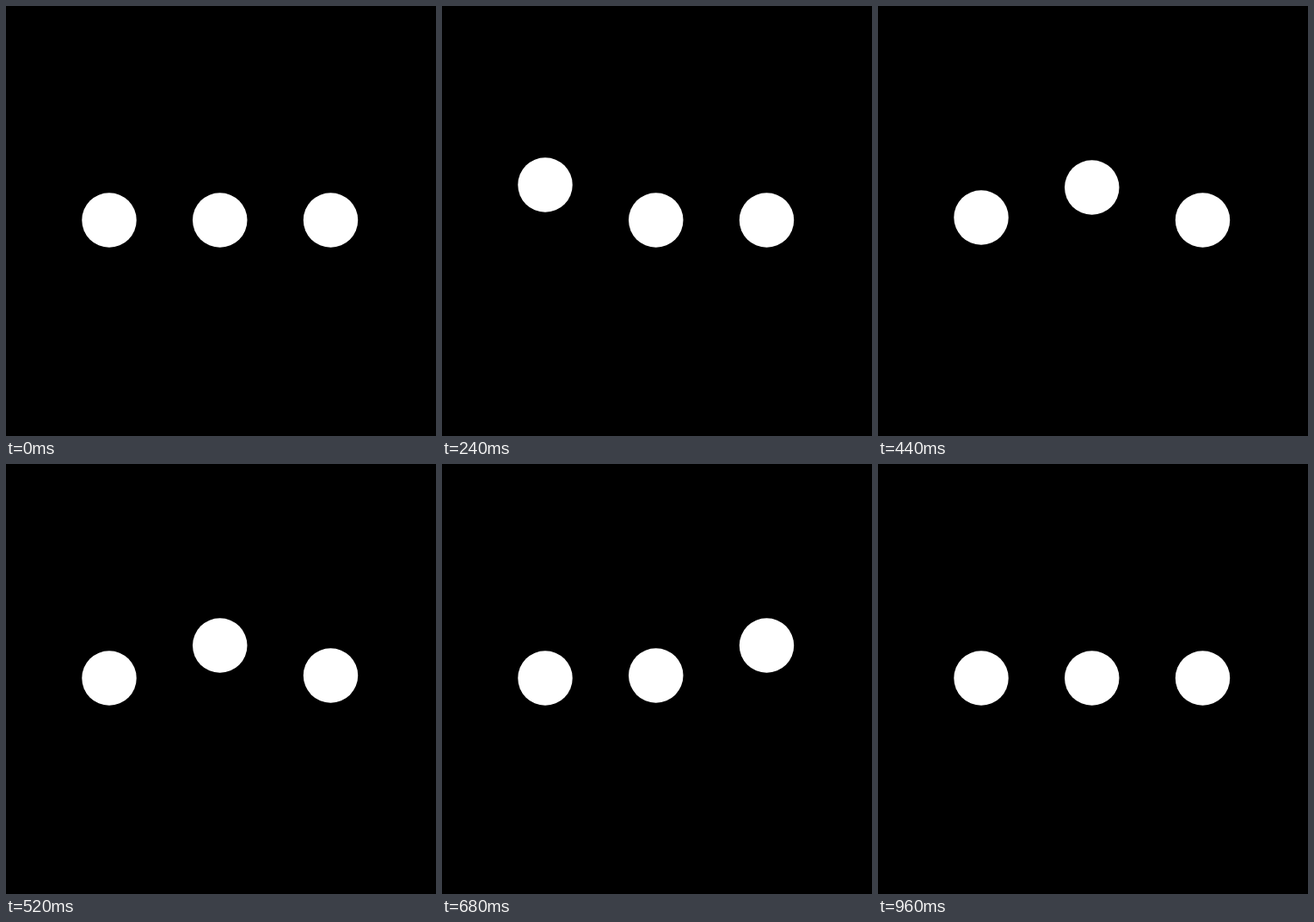
An HTML page that plays this animation: 500 px wide and 500 px high, repeating every 1160 ms.

```html
<!DOCTYPE html>
<html lang="en">
<head>
<meta charset="utf-8">
<title>Typing dots</title>
<style>
  @property --tick {
    syntax: "<number>";
    inherits: true;
    initial-value: 0;
  }

  html, body {
    margin: 0;
    width: 100%;
    height: 100%;
    overflow: hidden;
    background: #000;
  }

  /* 29 ticks of 40 ms each */
  svg {
    display: block;
    width: 100%;
    height: 100%;
    animation: clock 1160ms steps(29, end) infinite;
  }

  @keyframes clock {
    from { --tick: 0; }
    to { --tick: 29; }
  }

  /* Each dot rises for 6 ticks and falls for 6, eased by smoothstep */
  circle {
    --gap: calc(var(--tick) - var(--peak));
    --u: max(0, 1 - max(var(--gap), -1 * var(--gap)) / 6);
    --lift: calc(var(--u) * var(--u) * (3 - 2 * var(--u)));
    fill: #fff;
    transform: translateY(calc(var(--lift) * -41px));
  }

  .a { --peak: 6; }
  .b { --peak: 12; }
  .c { --peak: 18; }
</style>
</head>
<body>
<svg viewBox="0 0 500 500">
  <circle class="a" cx="120" cy="249" r="31.75"/>
  <circle class="b" cx="248.75" cy="249" r="31.75"/>
  <circle class="c" cx="377.5" cy="249" r="31.75"/>
</svg>
</body>
</html>
```
